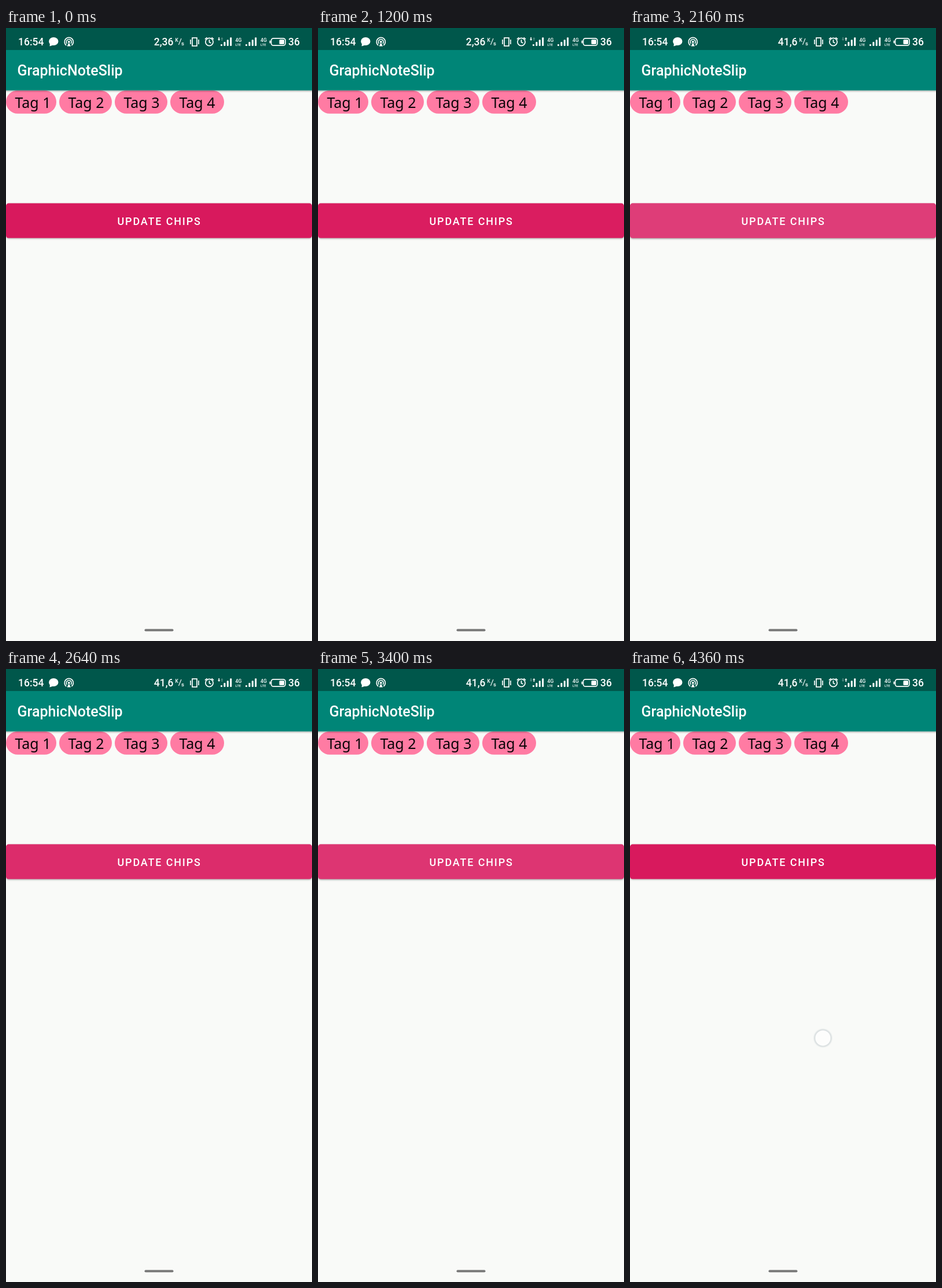
An HTML page for the animation above (4440 ms loop, 529 px wide and 1058 px high).

```html
<!DOCTYPE html>
<html lang="en">
<head>
<meta charset="utf-8">
<title>Chips</title>
<style>
  html, body { margin: 0; width: 100%; height: 100%; overflow: hidden; background: #f9faf8; }
  svg { display: block; width: 100%; height: 100%; }
  text { font-family: Roboto, sans-serif; font-weight: 500; fill: #fff; white-space: pre; }
  .status { font-size: 17.5px; }
  .chip { font: 400 25px "Noto Sans", sans-serif; fill: #0b0508; }
  .line { fill: none; stroke: #fff; stroke-width: 1.7; }
  .thin { stroke-width: 1.1; }
</style>
</head>
<body>
<svg viewBox="0 0 529 1058">
  <defs>
    <filter id="blur" x="-5%" y="-30%" width="110%" height="160%"><feGaussianBlur stdDeviation="1.5"/></filter>
    <linearGradient id="barShade" x2="0" y2="1">
      <stop offset="0" stop-color="#000" stop-opacity=".26"/>
      <stop offset="1" stop-color="#000" stop-opacity="0"/>
    </linearGradient>
    <radialGradient id="dotFill">
      <stop offset="0" stop-color="#fff" stop-opacity=".6"/>
      <stop offset=".74" stop-color="#fff" stop-opacity=".66"/>
      <stop offset=".82" stop-color="#b8c2c6" stop-opacity=".52"/>
      <stop offset="1" stop-color="#b8c2c6" stop-opacity="0"/>
    </radialGradient>
    <g id="bars" fill="#fff"></g>
    <g id="net">
      <text x="0" y="24" font-size="8.6">4G</text>
      <text x="0" y="31" font-size="6">LTE</text>
    </g>
  </defs>

  <rect width="529" height="1058" fill="#f9faf8"/>
  <g id="chips"></g>
  <rect y="107.5" width="529" height="4" fill="url(#barShade)"/>
  <rect y="38" width="529" height="69.7" fill="#008577"/>
  <rect width="529" height="38" fill="#00574b"/>
  <text x="19.5" y="82" font-size="25">GraphicNoteSlip</text>

  <text class="status" x="21" y="30">16:54</text>
  <ellipse cx="82.3" cy="23" rx="8.2" ry="7" fill="#fff"/>
  <path d="M76 26 L75.5 31.5 L83 29Z" fill="#fff"/>
  <g class="line">
    <path d="M104.2 30 A7.6 7.6 0 1 1 113.4 30"/>
    <path d="M105.6 27 A4.4 4.4 0 1 1 112 27"/>
  </g>
  <circle cx="108.8" cy="23.8" r="1.9" fill="#fff"/>
  <path d="M108.8 25 L112 31.5 H105.6Z" fill="#fff"/>

  <text class="status" id="speed" x="255.8" y="30"></text>
  <text x="292.5" y="24" font-size="8.6">K</text>
  <path class="line thin" d="M298.5 29 L303 18"/>
  <text x="303" y="30" font-size="9.5">s</text>

  <g class="line">
    <rect x="322" y="17" width="8" height="14"/>
    <path d="M319 20V28M333 20V28"/>
    <circle cx="351.5" cy="24" r="6.6"/>
    <path d="M351.5 20V24.5L354.5 26M344 19.3L347.5 16.3M359 19.3L355.5 16.3"/>
  </g>
  <path id="down" d="M367.4 16H369V19.3H370.4L368.2 22L366 19.3H367.4Z" fill="#fff"/>
  <path id="up" d="M372.6 22H374.2V18.7H375.6L373.4 16L371.2 18.7H372.6Z" fill="#fff"/>
  <use href="#bars" x="371"/>
  <use href="#net" x="396.5"/>
  <use href="#bars" x="414"/>
  <use href="#net" x="440"/>
  <rect class="line" x="458.5" y="17.8" width="24.5" height="12.4" rx="4"/>
  <rect x="455.5" y="21.5" width="2" height="5" rx="1" fill="#fff"/>
  <rect x="472.5" y="20" width="8.5" height="8" rx="1.5" fill="#fff"/>
  <text class="status" x="488" y="30">36</text>

  <rect id="shade" width="529" height="60" rx="5" filter="url(#blur)"/>
  <rect y="302.6" width="529" height="60" rx="4.5" fill="#d8195d"/>
  <rect id="glow" y="302.6" width="529" height="60" rx="4.5" fill="#e56394"/>
  <text x="192.5" y="340" font-size="18" letter-spacing="1.83">UPDATE CHIPS</text>
  <rect x="239.5" y="1037.3" width="50" height="4" rx="2" fill="#797979"/>
  <circle id="dot" r="17" fill="url(#dotFill)"/>
</svg>
<script>
const LOOP = 4440, STEP = 40, FADE = 320, DOT_FADE = 110, RISE = 100;
const $ = id => document.getElementById(id);
const clamp = v => Math.max(0, Math.min(1, v));

function add(parent, tag, attrs, text = '') {
  const el = document.createElementNS('http://www.w3.org/2000/svg', tag);
  for (const key in attrs) el.setAttribute(key, attrs[key]);
  el.textContent = text;
  parent.append(el);
}

// left edge, width
[[0, 87], [92, 91], [188, 91], [284, 93]].forEach(([x, width], i) => {
  add($('chips'), 'rect', { x, y: 107.7, width, height: 40, rx: 20, fill: '#ff7ba3' });
  add($('chips'), 'text', { x: x + 15.4, y: 138, class: 'chip' }, `Tag ${i + 1}`);
});
for (let i = 0; i < 4; i++) {
  const height = 3 + i * 3.9;
  add($('bars'), 'rect', { x: i * 5.4, y: 31 - height, width: 3, height, rx: 1 });
}

// press time, hold, finger position
const taps = [
  [800, 100, 436, 336], [1260, 100, 435, 334], [1760, 240, 434, 331],
  [2320, 80, 433, 328], [2720, 120, 432, 325], [3160, 40, 431, 322],
  [3520, 30, 430, 320], [3760, 40, 430, 320]
];

function draw(t) {
  let glow = 0, lift = 0, dot = [0, 0, 0];
  for (const [start, hold, x, y] of taps) {
    if (t < start) break;
    const after = t - start - hold;
    glow = Math.max(glow, clamp(1 - after / FADE));
    lift = glow * clamp((t - start) / RISE);
    dot = [x, y, clamp(1 - after / DOT_FADE)];
  }
  if (t >= 4360) dot = [333.5, 637, 1];

  $('glow').setAttribute('opacity', glow);
  $('shade').setAttribute('y', 303.6 + lift);
  $('shade').setAttribute('opacity', 0.3 + 0.1 * lift);
  $('dot').setAttribute('transform', `translate(${dot[0]} ${dot[1]})`);
  $('dot').setAttribute('opacity', dot[2]);

  $('speed').textContent = t < 1360 ? '2,36' : '41,6';
  const sending = t >= 1920 && t < 2600 || t >= 3120;
  $('up').setAttribute('opacity', sending ? 1 : 0.3);
  $('down').setAttribute('opacity', sending ? 0.3 : 1);
}

const began = performance.now();
function tick() {
  const t = (performance.now() - began) % LOOP;
  draw(Math.floor(t / STEP) * STEP);
  requestAnimationFrame(tick);
}
tick();
</script>
</body>
</html>
```
